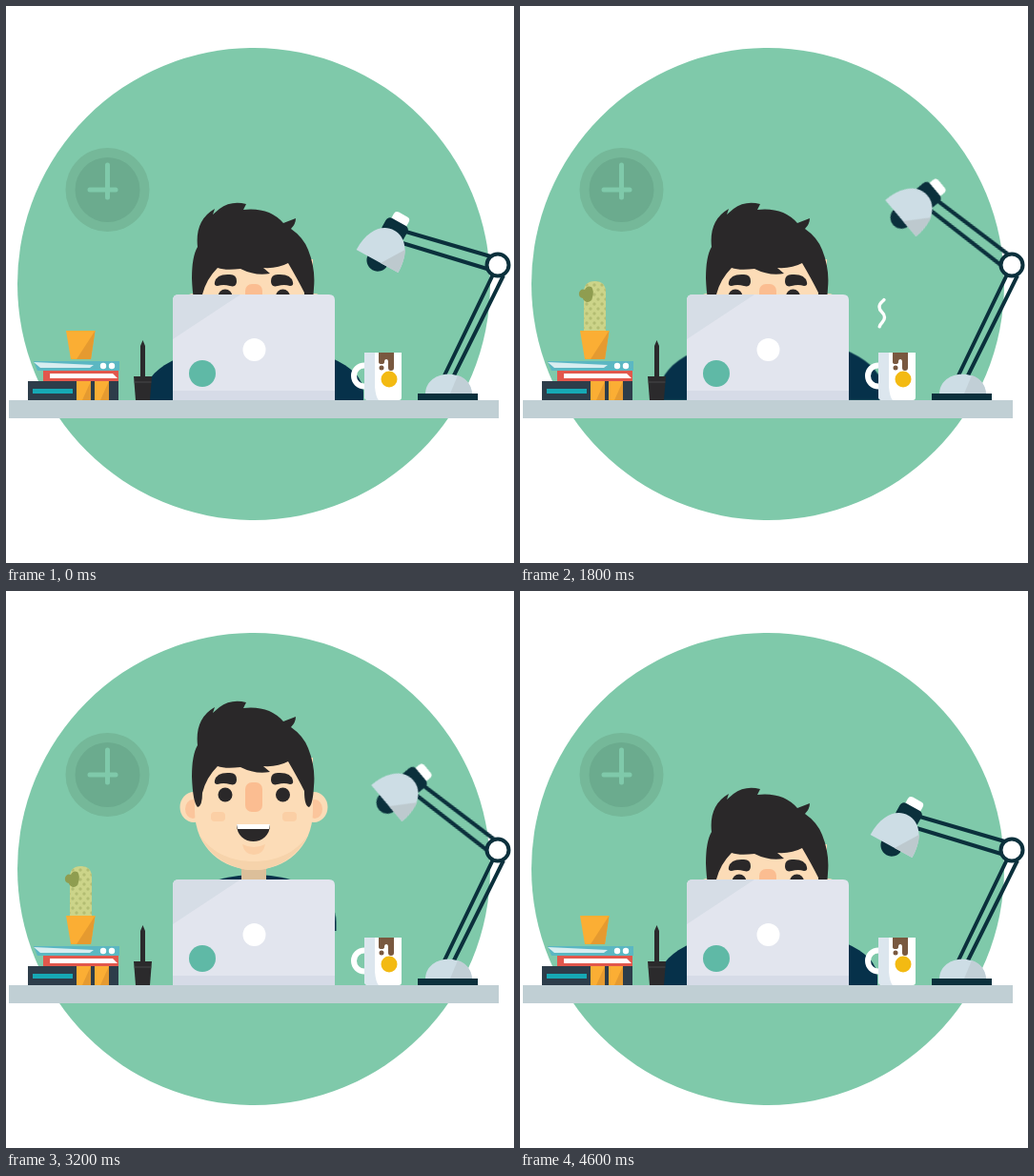
An HTML page for the animation above (4.64 s loop, 533 by 585 pixels).

```html
<!DOCTYPE html>
<html lang="en">
<head>
<meta charset="utf-8">
<title>Desk</title>
<style>
html, body { margin: 0; width: 100%; height: 100%; overflow: hidden; background: #fff; }
svg { display: block; width: 533px; height: 585px; }

.lamp, .cactus, .head, .body, .eyes, .smile, .oh, .beam, .steam path {
  animation: 4640ms cubic-bezier(.37, 0, .63, 1) infinite;
}
.lamp { transform-origin: 516px 272px; animation-name: lamp; }
.cactus { transform-origin: 78px 342px; animation-name: cactus; }
.head { animation-name: head; }
.body { transform-origin: 261px 414px; animation-name: body; }
.eyes { animation-name: eyes; }
.smile { transform-origin: 260px 250px; animation-name: smile; }
.oh { transform-origin: 260px 250px; animation-name: oh; }
.beam { animation-name: beam; }
.steam path {
  fill: none; stroke: #fff; stroke-width: 3.4; stroke-linecap: round;
  stroke-dasharray: 42 300;
  animation-name: steam; animation-timing-function: linear;
}

@keyframes lamp {
  0%, .86% { transform: rotate(0deg); }
  3.4% { transform: rotate(-2.8deg); }
  9.3% { transform: rotate(32deg); }
  14%, 70.7% { transform: rotate(21deg); }
  74.4% { transform: rotate(32deg); }
  80% { transform: rotate(-2.8deg); }
  83.6%, 100% { transform: rotate(0deg); }
}
@keyframes cactus {
  0%, 3.4% { transform: scale(0); }
  9.3% { transform: scale(1.1); }
  12.5%, 71.5% { transform: scale(1); }
  74.1% { transform: scale(1.1); }
  78.4%, 100% { transform: scale(0); }
}
@keyframes head {
  0%, 45.69% { transform: translateY(91px); }
  62.5% { transform: translateY(-16px); }
  67.67%, 84.91% { transform: translateY(0); }
  88.79% { transform: translateY(-15px); }
  96.55%, 100% { transform: translateY(91px); }
}
@keyframes body {
  0% { transform: none; }
  24.14%, 38.79% { transform: translate(3px, 0) scale(1.03, 1.13); }
  45.69% { transform: translate(0, 0) scale(1, 1); }
  62.5% { transform: translate(0, -73px) scale(.75, 1); }
  67.67%, 84.91% { transform: translate(0, -57px) scale(.75, 1); }
  88.79% { transform: translate(0, -72px) scale(.75, 1); }
  96.55%, 100% { transform: none; }
}
@keyframes eyes {
  0%, 25.86%, 51.72%, 100% { transform: translateX(0); }
  12.93% { transform: translateX(4px); }
  38.79% { transform: translateX(-4px); }
}
@keyframes smile {
  0%, 73.28% { transform: scale(1); opacity: 1; }
  75% { transform: scale(.35, .7); opacity: 1; }
  75.01%, 100% { transform: scale(.35, .7); opacity: 0; }
}
@keyframes oh {
  0%, 75% { transform: scale(1); opacity: 0; }
  75.01%, 100% { transform: scale(1); opacity: 1; }
}
@keyframes beam {
  0%, 19.4% { opacity: 0; }
  22.4%, 28% { opacity: 1; }
  32.3%, 100% { opacity: 0; }
}
@keyframes steam {
  0%, 30.17% { stroke-dashoffset: 42; opacity: 0; }
  30.5% { stroke-dashoffset: 40; opacity: 1; }
  49.5% { stroke-dashoffset: -98; opacity: 1; }
  49.6% { stroke-dashoffset: -100; opacity: 0; }
  49.7%, 77.84% { stroke-dashoffset: 42; opacity: 0; }
  78.2% { stroke-dashoffset: 40; opacity: 1; }
  97.1% { stroke-dashoffset: -98; opacity: 1; }
  97.2%, 100% { stroke-dashoffset: -100; opacity: 0; }
}
</style>
</head>
<body>
<svg viewBox="0 0 533 585">
  <defs>
    <radialGradient id="glow" gradientUnits="userSpaceOnUse" cx="400" cy="220" r="150">
      <stop offset="0" stop-color="#fff" stop-opacity=".55"/>
      <stop offset=".45" stop-color="#fff" stop-opacity=".25"/>
      <stop offset="1" stop-color="#fff" stop-opacity="0"/>
    </radialGradient>
    <pattern id="spots" width="8" height="10" patternUnits="userSpaceOnUse" x="68" y="291">
      <circle cx="2" cy="2" r="1.7" fill="#b3bd72"/>
      <circle cx="6" cy="7" r="1.7" fill="#b3bd72"/>
    </pattern>
  </defs>

  <circle cx="260" cy="292" r="248" fill="#7fc9aa"/>

  <g class="clock">
    <circle cx="106.500" cy="193" r="44" fill="#75b899"/>
    <circle cx="106.500" cy="193" r="34" fill="#6bab8e"/>
    <path d="M106.500 167V201M88 193H115" stroke="#7fc9aa" stroke-width="5" stroke-linecap="round"/>
  </g>

  <path class="body" d="M147 414V405A114 50 0 0 1 375 405V414Z" fill="#06314a"/>

  <g class="head">
    <path d="M247 280H273V312H247Z" fill="#dcbf9a"/>
    <g fill="#fcdcb7">
      <ellipse cx="197" cy="227" rx="14.500" ry="16"/>
      <ellipse cx="323" cy="227" rx="14.500" ry="16"/>
    </g>
    <g fill="#fbc59c">
      <ellipse cx="196" cy="229" rx="8" ry="10"/>
      <ellipse cx="324" cy="229" rx="8" ry="10"/>
    </g>
    <path d="M198 175V231C198 270 228 293 260 293S322 270 322 231V175Z" fill="#fcdcb7"/>
    <path d="M203 256C214 280 238 293 260 293S306 280 317 256C304 276 282 284 260 284S216 276 203 256Z" fill="#f6d3ab"/>
    <g fill="#fbcfa5">
      <rect x="215" y="232" width="15" height="10" rx="4"/>
      <rect x="290" y="232" width="15" height="10" rx="4"/>
      <path d="M248 266Q260 272 272 266Q270 277 260 277T248 266Z"/>
    </g>
    <rect x="251" y="201" width="18" height="31" rx="7" fill="#fbbd91"/>
    <g fill="#2a2829">
      <g class="eyes">
        <circle cx="230" cy="214" r="7.500"/>
        <circle cx="290.500" cy="214" r="7.500"/>
      </g>
      <path d="M219 199Q221 190 235 191Q242 191 242 198T235 203Q228 201 222 203Q218 203 219 199Z"/>
      <path d="M301 199Q299 190 285 191Q278 191 278 198T285 203Q292 201 298 203Q302 203 301 199Z"/>
      <path d="M201 227Q196 222 195 195Q195 172 201 162Q198 134 219 122L217 128L224 122Q236 113 252 117L249 123Q276 120 291 137L304 132Q304 138 299 143Q312 152 317 165Q325 185 323 205Q322 224 318 227Q313 226 313 210Q306 196 296 179Q285 185 270 184L277 190Q262 193 246 185Q230 187 222 184Q210 196 206 212Q206 226 201 227Z"/>
    </g>
    <g class="smile">
      <path d="M242 245H277C277 269 242 269 242 245Z" fill="#2a2829"/>
      <path d="M242 245H277L276 250H243Z" fill="#fff"/>
    </g>
    <circle class="oh" cx="260" cy="250" r="6.200" fill="#2a2829"/>
  </g>

  <path class="beam" d="M385 202L255 212Q270 330 370 372L415 240Z" fill="none"/>

  <g class="laptop">
    <path d="M175 414V309Q175 303 181 303H339Q345 303 345 309V414Z" fill="#e2e5ee"/>
    <path d="M175 350V309Q175 303 181 303H246Z" fill="#d6dde6"/>
    <path d="M175 404H345V414H175Z" fill="#d6dbe7"/>
    <circle cx="260.500" cy="361" r="12" fill="#fff"/>
    <circle cx="206" cy="386" r="14" fill="#5fb9a6"/>
  </g>

  <g class="pens" fill="#2b2a2c">
    <path d="M141 392V357L143.500 351L146 357V392Z"/>
    <path d="M134 389H153L151 414H136Z"/>
    <path d="M134.500 395H152.500" stroke="#48484a"/>
  </g>

  <g class="books">
    <path d="M23 394H118V414H23Z" fill="#2d3d4a"/>
    <path d="M28 402H70V407H28Z" fill="#16a9b5"/>
    <path d="M74 394H89V414H74ZM93 394H108V414H93Z" fill="#fbae34"/>
    <path d="M89 394V414H80ZM108 394V414H99Z" fill="#e59a30"/>
    <path d="M39 383H118V394H39Z" fill="#e2574c"/>
    <path d="M46 386H112L117 391H46Z" fill="#fff"/>
    <path d="M29 373H119V383H33Z" fill="#5bb7c2"/>
    <path d="M29 374L92 377L88 380H36Z" fill="#d8edf0"/>
    <circle cx="102" cy="378" r="3.200" fill="#fff"/>
    <circle cx="111" cy="378" r="3.200" fill="#fff"/>
  </g>

  <g class="cactus">
    <path d="M67 343V301Q67 289 78.500 289T90 301V343Z" fill="#ccd489"/>
    <path d="M67 343V301Q67 289 78.500 289T90 301V343Z" fill="url(#spots)"/>
    <path d="M70 311Q66 309 66 307Q61 306 62 301Q64 296 68 298Q70 293 75 295Q78 299 76 306Q75 311 70 311Z" fill="#8f9d50"/>
  </g>
  <path d="M63 341H93.500L89 371H68Z" fill="#fbae34"/>
  <path d="M93.500 341L89 371H74Z" fill="#e59a30"/>

  <g class="mug">
    <circle cx="376" cy="388.500" r="11" fill="none" stroke="#fff" stroke-width="6"/>
    <path d="M376 364H415V411Q415 414 412 414H380Q376 414 376 410Z" fill="#fff"/>
    <path d="M376 364H387V400Q388 411 391 414H380Q376 414 376 410Z" fill="#dce6ee"/>
    <path d="M391 364H407V380Q407 383 404 383T401 380V374Q401 371 399 371T397 374Q397 376 394 376T391 374Z" fill="#79583f"/>
    <circle cx="394" cy="380" r="2.500" fill="#79583f"/>
    <circle cx="402" cy="392" r="8.500" fill="#f3ba12"/>
  </g>

  <g class="steam">
    <path id="puff" pathLength="100" d="M382.500 352C382.500 345 377 346 377 339S382.500 333 382.500 327S377 322 377 316S383 311 383 305S377 300 377 294S382.500 288 382.500 282"/>
    <use href="#puff" x="14"/>
    <use href="#puff" x="28"/>
  </g>

  <path d="M3 414H517V433H3Z" fill="#c0cfd4"/>

  <g fill="none" stroke="#0b303c" stroke-width="4">
    <path d="M460 388L511 282M469 390L522 283"/>
    <path d="M432 410.500H495" stroke-width="7"/>
  </g>
  <path d="M440 407C441 380 487 380 489 407Z" fill="#cddde5"/>
  <path d="M489 407C488 397 482 390 474 388L466 407Z" fill="#c1cfd6"/>

  <g class="lamp">
    <path d="M512 264L416 236M508 277L416 249" stroke="#0b303c" stroke-width="4"/>
    <g transform="translate(389.500 268) rotate(29)">
      <circle cy="-1" r="11.500" fill="#0b303c"/>
      <rect x="-9" y="-56" width="18" height="15" rx="4" fill="#fff"/>
      <rect x="-13" y="-47" width="26" height="18" rx="5" fill="#0b303c"/>
      <path d="M-25 0C-25 -25 -13 -37 0 -37S25 -25 25 0Z" fill="#cddde5"/>
      <path d="M4 0L20 -25Q25 -14 25 0Z" fill="#bdc9ce"/>
    </g>
  </g>
  <circle cx="516" cy="272" r="11.500" fill="#fff" stroke="#0b303c" stroke-width="4"/>

  <path class="beam" d="M385 202L255 212Q270 330 370 372L415 240Z" fill="url(#glow)"/>
</svg>
</body>
</html>
```
